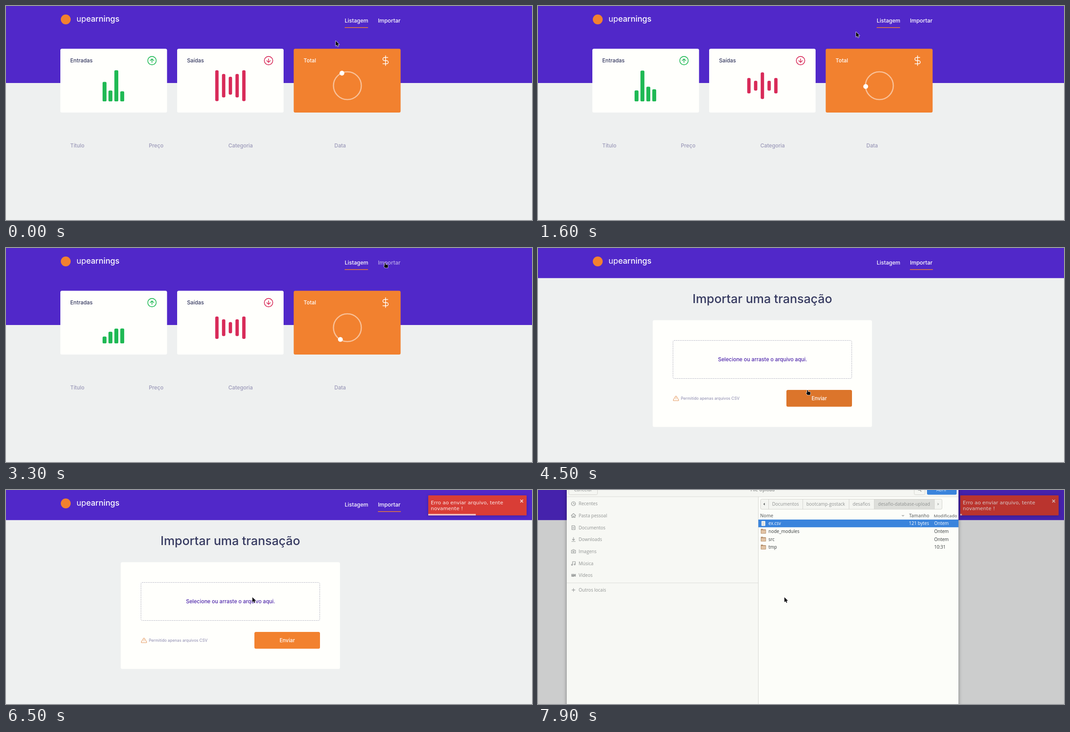
An HTML page with a canvas that plays this animation: 1171 px wide and 478 px high, repeating every 8 s.

```html
<!DOCTYPE html>
<html lang="pt-BR">
<head>
<meta charset="utf-8">
<title>Finanças</title>
<style>
  html, body { margin: 0; width: 100%; height: 100%; overflow: hidden; background: #eef0f0; }
  canvas { display: block; }
</style>
</head>
<body>
<canvas id="stage" width="1171" height="478"></canvas>
<script>
const ctx = document.getElementById('stage').getContext('2d');
const LOOP = 8000, STEP = 100;
const PURPLE = '#5128c9', ORANGE = '#f2812f', PAPER = '#fffffc', INK = '#363a60', MUTED = '#9a98b8';
const UI = 'Inter, sans-serif', DESKTOP = '"Open Sans", "Noto Sans", sans-serif';

// Linear interpolation through rows of [time, ...values].
function along(rows, t) {
  const i = rows.findIndex(row => row[0] > t);
  if (i === 0) return rows[0].slice(1);
  if (i < 0) return rows[rows.length - 1].slice(1);
  const a = rows[i - 1], b = rows[i], p = (t - a[0]) / (b[0] - a[0]);
  return a.slice(1).map((v, k) => v + (b[k + 1] - v) * p);
}

// Value of a cyclic list with equally spaced stops.
function cycle(values, seconds, period) {
  const phase = ((seconds / period) % 1 + 1) % 1 * (values.length - 1);
  const i = Math.floor(phase);
  return values[i] + (values[i + 1] - values[i]) * (phase - i);
}

function box(x, y, w, h, fill, radius = 0) {
  ctx.beginPath();
  ctx.roundRect(x, y, w, h, radius);
  ctx.fillStyle = fill;
  ctx.fill();
}

function outline(x, y, w, h, color, radius = 0, dash = []) {
  ctx.beginPath();
  ctx.roundRect(x, y, w, h, radius);
  ctx.setLineDash(dash);
  ctx.strokeStyle = color;
  ctx.lineWidth = 1;
  ctx.stroke();
  ctx.setLineDash([]);
}

function disc(x, y, r, fill) {
  ctx.beginPath();
  ctx.arc(x, y, r, 0, Math.PI * 2);
  ctx.fillStyle = fill;
  ctx.fill();
}

function text(str, x, y, color, size, { weight = 500, family = UI, align = 'left' } = {}) {
  ctx.font = `${weight} ${size}px ${family}`;
  ctx.textAlign = align;
  ctx.fillStyle = color;
  ctx.fillText(str, x, y);
}

function strokePath(d, x, y, color, width = 1, scale = 1) {
  ctx.save();
  ctx.translate(x, y);
  ctx.scale(scale, scale);
  ctx.strokeStyle = color;
  ctx.lineWidth = width / scale;
  ctx.lineCap = ctx.lineJoin = 'round';
  ctx.stroke(new Path2D(d));
  ctx.restore();
}

function header(height, active, hover) {
  box(0, 0, 1171, height, PURPLE);
  disc(133, 30, 11, ORANGE);
  text('up', 157, 35, '#fff', 17.8, { weight: 400 });
  const start = 157 + ctx.measureText('up').width;
  text('earnings', start, 35, '#fff', 17.8);
  text('Listagem', 754, 37, '#fff', 12);
  text('Importar', 828, 37, `rgba(255,255,255,${1 - 0.4 * hover})`, 12.3);
  if (active === 'list') box(754, 47.4, 52, 1.5, ORANGE);
  else box(828, 47.4, 51, 1.5, ORANGE);
}

const AUDIO = [
  [4.3, [20, 45, 57, 80, 64, 32, 66, 45, 64, 23, 66, 13, 64, 56, 34, 34, 2, 23, 76, 79, 20]],
  [2, [80, 55, 33, 5, 75, 23, 73, 33, 12, 14, 60, 80]],
  [1.4, [50, 34, 78, 23, 56, 23, 34, 76, 80, 54, 21, 50]],
  [2, [30, 45, 13, 80, 56, 72, 45, 76, 34, 23, 67, 30]]
];
const PULSE = [120, 110, 100, 90, 80, 70, 60, 50, 40, 140, 120];
const CLOCK = [[0, 30.398], [0.9, 31.335], [2.3, 32.684], [3.4, 33.8]];

function loaders(t) {
  const [clock] = along(CLOCK, t);
  AUDIO.forEach(([period, values], i) => {
    const h = cycle(values, clock, period) * 0.875;
    box(215 + i * 13.125, 213 - h, 8.75, h, '#1fb954', 2.6);
  });
  for (let i = 0; i < 5; i++) {
    const h = cycle(PULSE, clock - Math.abs(i - 2) * 0.25, 1) / 2;
    box(465.8 + i * 15, 178 - h / 2, 7.5, h, '#d82b59', 3);
  }
  ctx.beginPath();
  ctx.arc(760, 178, 31, 0, Math.PI * 2);
  ctx.strokeStyle = 'rgba(255,255,255,.5)';
  ctx.lineWidth = 2.7;
  ctx.stroke();
  const angle = (clock * 180 + 175) * Math.PI / 180;
  disc(760 + 30.5 * Math.cos(angle), 178 + 30.5 * Math.sin(angle), 5.4, '#fff');
}

function arrowIcon(x, color, flip) {
  ctx.beginPath();
  ctx.arc(x, 122, 9.4, 0, Math.PI * 2);
  ctx.strokeStyle = color;
  ctx.lineWidth = 1.6;
  ctx.stroke();
  strokePath(flip ? 'M0-4V4M-4 0L0 4L4 0' : 'M0 4V-4M-4 0L0-4L4 0', x, 122, color, 1.6);
}

function listing(t, hover) {
  header(172, 'list', hover);
  box(121, 95.5, 237.5, 142.5, PAPER, 3.5);
  box(381, 95.5, 237, 142.5, PAPER, 3.5);
  box(640.5, 95.5, 238, 142.5, ORANGE, 3.5);
  text('Entradas', 143, 126, INK, 11.8);
  text('Saídas', 403, 126, INK, 11.8);
  text('Total', 662.5, 126, '#fff', 11.8);
  arrowIcon(325, '#1fb954', false);
  arrowIcon(584.5, '#d82b59', true);
  strokePath('M12 1V23M17 5H9.5a3.5 3.5 0 0 0 0 7h5a3.5 3.5 0 0 1 0 7H6', 833, 110, '#fff', 1.5);
  loaders(t);
  [['Título', 143], ['Preço', 318], ['Categoria', 495], ['Data', 731]]
    .forEach(([label, x]) => text(label, x, 315.7, MUTED, 11.7));
}

const PRESS = [[4.4, 0], [4.5, 0.09], [4.6, 0.19], [4.7, 0.22], [5.7, 0.22], [5.9, 0]];

function importing(t, hover) {
  header(67.3, 'import', hover);
  text('Importar uma transação', 499.5, 123, INK, 27.2, { align: 'center' });
  box(255.5, 161.3, 488, 238.5, PAPER, 3.5);
  outline(300.5, 206.5, 398, 85, '#9c9db0', 3, [2, 2]);
  text('Selecione ou arraste o arquivo aqui.', 500, 252.5, '#4f27ab', 11.6, { align: 'center' });
  strokePath('M10.3 3.9L1.8 18a2 2 0 0 0 1.7 3h17a2 2 0 0 0 1.7-3L13.7 3.9a2 2 0 0 0-3.4 0zM12 9v4M12 17v.1',
    300.3, 329, '#e5975c', 1.1, 0.57);
  text('Permitido apenas arquivos CSV', 318, 338.8, MUTED, 8.7);
  box(553, 317, 146, 37.6, ORANGE, 3.5);
  box(553, 317, 146, 37.6, `rgba(0,0,0,${along(PRESS, t)[0]})`, 3.5);
  text('Enviar', 626, 339.6, '#fff', 11.5, { align: 'center' });
  if (t >= 4.9 && t < 5.8) outline(607.5, 327.5, 36, 16.5, 'rgba(50,30,40,.75)', 0, [1, 1]);
}

// Bouncing entry from the right, as fractions of its duration.
const BOUNCE = [[0, 3000], [0.6, -25], [0.75, 10], [0.9, -5], [1, 0]];

function bounce(p) {
  if (p >= 1) return 0;
  const i = BOUNCE.findIndex(row => row[0] > p);
  const [p0, v0] = BOUNCE[i - 1], [p1, v1] = BOUNCE[i];
  return v1 + (v0 - v1) * (1 - (p - p0) / (p1 - p0)) ** 3;
}

function toast(t) {
  if (t < 5) return;
  const x = 940 + bounce((t - 5) / 0.7) * 0.68;
  ctx.save();
  ctx.shadowColor = 'rgba(0,0,0,.22)';
  ctx.shadowBlur = 7;
  ctx.shadowOffsetY = 1;
  box(x, 12, 219, 44.7, '#d93d36', 1);
  ctx.restore();
  const style = { weight: 400, family: '"DejaVu Sans", sans-serif' };
  text('Erro ao enviar arquivo, tente', x + 5.8, 32, '#fbecea', 11.2, style);
  text('novamente !', x + 5.8, 45.3, '#fbecea', 11.2, style);
  strokePath('M-2.6-2.6L2.6 2.6M2.6-2.6L-2.6 2.6', x + 208, 24.7, 'rgba(255,255,255,.75)', 1.7);
  const left = Math.max(0, 1 - (t - 4.95) / 3);
  box(x, 53.4, 219 * left, 3.3, 'rgba(255,255,255,.72)');
}

const PLACES = [
  ['Recentes', 30.5, 'M0-4.5a4.5 4.5 0 1 0 .01 0zM0-2.5V.5H2.5'],
  ['Pasta pessoal', 57, 'M-5 0L0-4.5L5 0M-3.5 0V4.5H-1V1H1V4.5H3.5V0'],
  ['Documentos', 84, 'M-3.5-4.5H1.5L3.5-2.5V4.5H-3.5zM-1.5-1H1.5M-1.5 1.5H1.5'],
  ['Downloads', 110.5, 'M0-4.5V2M-2.5-.5L0 2L2.5-.5M-4 4.5H4'],
  ['Imagens', 137, 'M-4.5-2.5H-2L-1-4H1L2-2.5H4.5V4H-4.5zM0-1a1.6 1.6 0 1 0 .01 0z'],
  ['Música', 164, 'M-2 3V-4H4V2M-2 3a1.3 1.3 0 1 1-.01-.1M4 2a1.3 1.3 0 1 1-.01-.1'],
  ['Vídeos', 190.5, 'M-4-2.5H1.5V2.5H-4zM-3-1H1M-3 .5H1M-3 1.5H1M2 0L4.5-2.5V2.5z'],
  ['Outros locais', 223.3, 'M-3.5 0H3.5M0-3.5V3.5']
];
const FILES = [['ex.csv', 'Ontem'], ['node_modules', 'Ontem'], ['src', 'Ontem'], ['tmp', '10:31']];
const CRUMBS = [['Documentos', 513, 589], ['bootcamp-gostack', 589, 692], ['desafios', 692, 748],
  ['desafio-database-upload', 748, 882]];

function fileDialog() {
  const plain = { weight: 400, family: DESKTOP }, bold = { weight: 600, family: DESKTOP };
  const centered = { ...plain, align: 'center' };
  const grey = '#8f9291', edge = '#d3d3ce';
  box(0, 0, 1171, 478, 'rgba(0,0,0,.145)');
  ctx.save();
  ctx.shadowColor = 'rgba(0,0,0,.4)';
  ctx.shadowBlur = 8;
  box(64, -40, 872, 560, '#fcfdf9');
  ctx.restore();
  box(64, 0, 426, 478, '#f7f8f4');
  box(64, 0, 872, 15, '#f5f6f2');
  box(64, 14.5, 872, 1, '#dbdcd7');
  box(490, 15, 1, 478, '#d6d7d2');

  outline(68.5, -15, 64, 25.5, edge, 3);
  text('Cancelar', 100.5, 2.5, grey, 10, centered);
  text('File Upload', 500, 2.5, grey, 10, { ...bold, align: 'center' });
  outline(837.5, -15, 24, 25.5, edge, 3);
  strokePath('M-1-5a3 3 0 1 0 .01 0zM1.5 1L4 3.5', 849, -0.5, grey, 1.3);
  box(866, -15, 66, 25.5, '#3a84dc', 3);
  text('Abrir', 898.5, 2.5, '#dcebfa', 10, centered);

  PLACES.forEach(([name, y, icon]) => {
    strokePath(icon, 79, y, '#969998', 1.2);
    text(name, 90.5, y + 3.6, grey, 10, plain);
  });
  box(64, 207, 426, 1, '#dcddd8');

  box(495, 20, 405, 23, '#f4f5f1', 3);
  CRUMBS.forEach(([name, left, right], i) => {
    if (i === 3) box(left, 20, right - left, 23, '#dddeda');
    box(left, 20, 1, 23, edge);
    text(name, (left + right) / 2, 35, grey, 10, centered);
  });
  box(882, 20, 1, 23, edge);
  outline(495.5, 20.5, 404, 22.5, edge, 3);
  ctx.fillStyle = '#6d706f';
  ctx.fill(new Path2D('M505 28.5V34.5L501.5 31.5z'));
  ctx.fillStyle = '#b9bbb8';
  ctx.fill(new Path2D('M889.5 28.5V34.5L893 31.5zM809 56H816L812.5 59.5z'));

  text('Nome', 494.5, 60.6, '#777a7a', 10, bold);
  text('Tamanho', 871, 60.6, '#777a7a', 10, { ...bold, align: 'right' });
  text('Modificado', 881, 60.6, '#777a7a', 9.7, bold);
  box(490.5, 66, 445.5, 17.3, '#3a84dc');
  FILES.forEach(([name, when], i) => {
    const y = 74.7 + i * 17.6, color = i ? '#333738' : '#fff';
    if (i) {
      box(496, y - 5.5, 5, 3, '#b58f6c', 1);
      box(496, y - 4.3, 11.5, 9.5, '#b58f6c', 1);
      box(497, y - 2.5, 9.5, 6.8, '#e2c5a6', 0.5);
    } else {
      box(497.5, y - 5.5, 8.5, 11, '#f2f3f1', 1);
      strokePath('M0 0H4M0 2.5H4M0 5H4', 499.7, y - 2, '#b9bcbb', 0.8);
    }
    text(name, 513, y + 3.6, color, 10, plain);
    text(when, 882, y + 3.6, color, 10, plain);
  });
  text('121 bytes', 870.5, 78.3, '#fff', 10, { ...plain, align: 'right' });
}

const POINTER = [
  [0, 734, 78], [0.1, 728, 76], [0.3, 560, 62], [0.5, 330, 40], [0.6, 215, 24], [0.7, 186, 19],
  [0.9, 230, 34], [1, 232, 36], [1.2, 330, 60], [1.5, 650, 66], [1.8, 824, 42], [2, 845, 34],
  [2.3, 844, 33], [3.7, 844, 33], [3.8, 790, 110], [3.9, 697, 243], [4, 697, 243], [4.3, 600, 317],
  [4.5, 600, 317], [4.7, 583, 305], [5.7, 583, 305], [6, 548.5, 239.5]
];
const HAND_TIMES = [[0.55, 1.05], [1.85, 3.75], [4.25, 5.75]];
const ARROW = new Path2D('M0 0V11L2.6 8.7L4.4 12.6L6.2 11.8L4.5 8H8z');
const HAND = new Path2D('M-1 1Q0-.6 1 1V4L5.5 4.6Q6.8 5 6.5 7.5L5.8 11.2H-.2L-3 7Q-3 5.6-1.6 6.2L-1 6.8z');

function pointer(t) {
  const [x, y] = along(POINTER, t);
  const shape = HAND_TIMES.some(([from, to]) => t >= from && t < to) ? HAND : ARROW;
  ctx.save();
  ctx.translate(x, y);
  ctx.strokeStyle = 'rgba(255,255,255,.85)';
  ctx.lineWidth = 1.5;
  ctx.lineJoin = 'round';
  ctx.stroke(shape);
  ctx.fillStyle = '#0b0b0d';
  ctx.fill(shape);
  ctx.restore();
}

const HOVER = [[1.9, 0], [2.1, 1], [3.7, 1], [3.9, 0]];

function draw(t) {
  const [hover] = along(HOVER, t);
  box(0, 0, 1171, 478, '#eef0f0');
  if (t < 3.4) listing(t, hover);
  else importing(t, hover);
  toast(t);
  if (t >= 7.85) fileDialog();
  pointer(t);
}

function tick() {
  const ms = performance.now() % LOOP;
  draw(Math.floor(ms / STEP) * STEP / 1000);
  requestAnimationFrame(tick);
}
tick();
</script>
</body>
</html>
```
